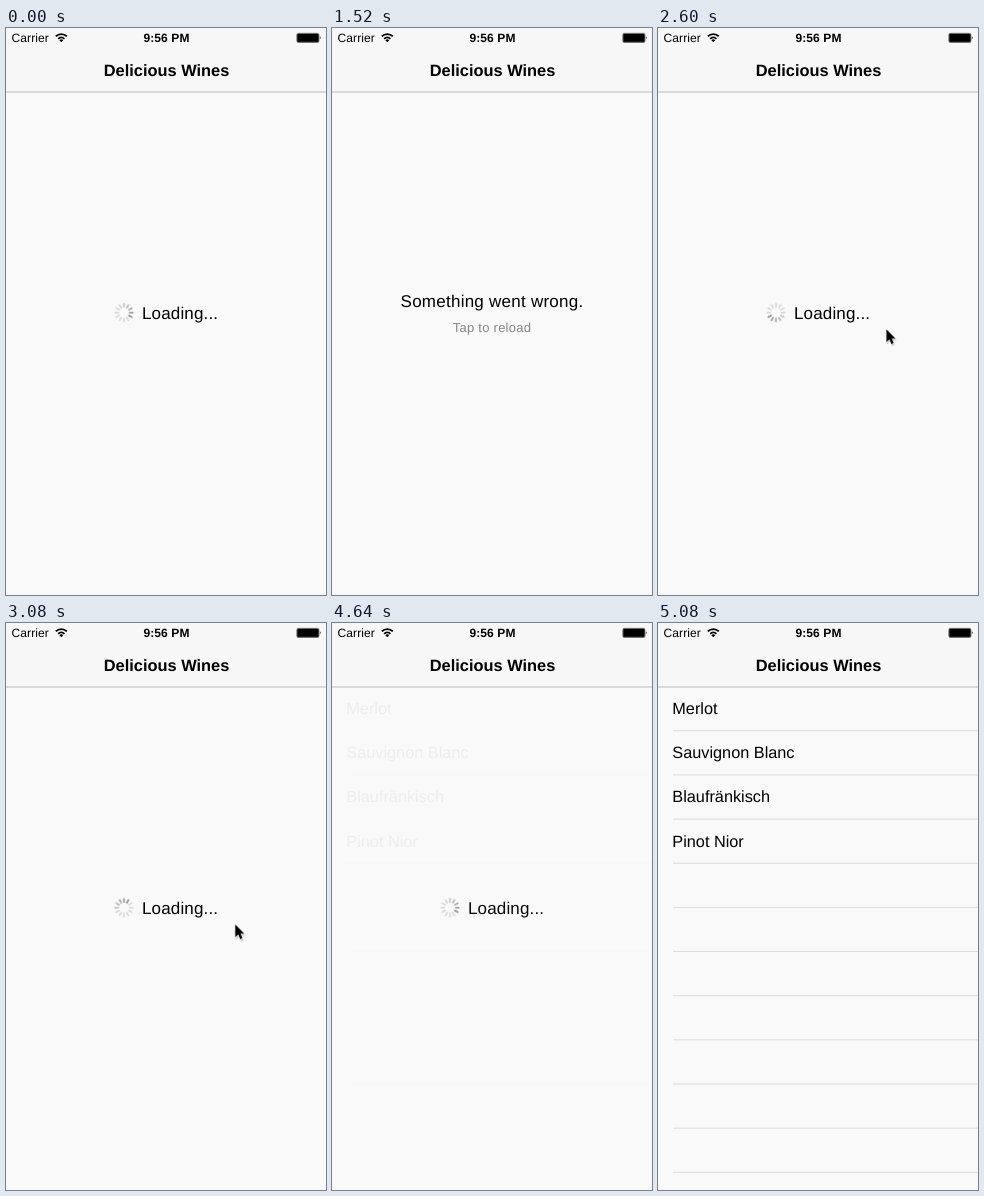
An HTML page that plays this animation: 320x567 px, repeating every 6.28 s.

```html
<!DOCTYPE html>
<html lang="en">
<head>
<meta charset="utf-8">
<title>Loading list</title>
<style>
  html, body { margin: 0; width: 100%; height: 100%; overflow: hidden; background: #f9f9f9; }
  svg { display: block; width: 100vw; height: 100vh; }
  text {
    font-family: "Liberation Sans", Arial, Helvetica, sans-serif;
    font-size: 17px;
    text-rendering: geometricPrecision;
  }
  .bar text { font-size: 12px; letter-spacing: .1px; }
  .bar .time { font-weight: bold; }
  .bar .title { font-size: 16.4px; font-weight: bold; letter-spacing: 0; }
  .mid { text-anchor: middle; }
  .error text { letter-spacing: .25px; }
  .error .hint { font-size: 13px; fill: #858585; }
  .list text { font-size: 16.3px; }

  .loading, .error, .list, .cursor { animation: 6280ms linear infinite; }
  .loading { animation-name: loading; }
  .error { animation-name: error; }
  .list { animation-name: list; }
  .cursor { animation-name: cursor; }
  .spin { animation: spin 6280ms -20ms infinite; }

  @keyframes loading {
    0% { opacity: 1; }
    20.38% { opacity: 1; animation-timing-function: ease-in-out; }
    24.2%, 41.39% { opacity: 0; }
    41.4% { opacity: 1; }
    73.2% { opacity: 1; animation-timing-function: ease-in-out; }
    78.34%, 100% { opacity: 0; }
  }
  @keyframes error {
    0% { opacity: 0; }
    20.38% { opacity: 0; animation-timing-function: ease-in-out; }
    24.2%, 41.39% { opacity: 1; }
    41.4%, 100% { opacity: 0; }
  }
  @keyframes list {
    0% { opacity: 0; }
    73.1% { opacity: 0; animation-timing-function: ease-in-out; }
    78.34%, 100% { opacity: 1; }
  }
  /* One spoke every 100 ms; the second run starts afresh with the reload. */
  @keyframes spin {
    0% { transform: rotate(120deg); animation-timing-function: steps(26); }
    41.39% { transform: rotate(900deg); animation-timing-function: step-end; }
    41.4% { transform: rotate(240deg); animation-timing-function: steps(36); }
    98.73%, 100% { transform: rotate(1320deg); }
  }
  @keyframes cursor {
    0%, 31.2% { transform: translate(330px, 335px); }
    31.85% { transform: translate(311px, 331px); animation-timing-function: ease-out; }
    38.22%, 49.04% { transform: translate(228px, 301px); }
    49.68% { transform: translate(250px, 303px); }
    50.32% { transform: translate(295px, 306px); }
    50.96%, 100% { transform: translate(340px, 308px); }
  }
</style>
</head>
<body>
<svg viewBox="0 0 320 567" preserveAspectRatio="none">
  <rect width="320" height="567" fill="#f9f9f9"/>

  <g class="list" id="list"></g>

  <g class="error">
    <text class="mid" x="160" y="279">Something went wrong.</text>
    <text class="mid hint" x="160" y="304">Tap to reload</text>
  </g>

  <g class="loading">
    <g transform="translate(118 284.7)"><g class="spin" id="spin"></g></g>
    <text x="136" y="290.800" letter-spacing=".15">Loading...</text>
  </g>

  <g class="bar">
    <rect width="320" height="64" fill="#f7f7f7"/>
    <rect y="63.5" width="320" height="1" fill="#bcbcbc"/>
    <text x="5.5" y="14.3">Carrier</text>
    <g fill="none" stroke="#000" stroke-width="1.8">
      <path d="M49.8 8.4a7.8 7.8 0 0 1 11 0M52.2 10.8a4.4 4.4 0 0 1 6.2 0"/>
      <path d="M55.3 14.2l-1.9-1.9a2.7 2.7 0 0 1 3.8 0z" fill="#000" stroke="none"/>
    </g>
    <text class="mid time" x="160.5" y="14.3">9:56 PM</text>
    <rect x="290.8" y="5.3" width="22.200" height="9.200" rx="1.600" fill="#666" stroke="#333" stroke-width=".5"/>
    <rect x="291.5" y="6" width="20.800" height="7.800" rx=".9"/>
    <path d="M313.9 8.3q1.600 1.600 0 3.200z"/>
    <text class="mid title" x="160.5" y="48">Delicious Wines</text>
  </g>

  <g class="cursor">
    <g transform="scale(.94)">
      <path d="M1 2v14.500l3.400-3 2.300 5 2.700-1.200-2.200-4.800h4.300z" opacity=".15"/>
      <path d="M.5 .5v13.500l3.200-2.900 2.100 4.900 2.400-1-2.100-4.800h4.100z" stroke="#fff" paint-order="stroke"/>
    </g>
  </g>
</svg>
<script>
  const add = (parent, tag, attrs, text = "") => {
    const el = document.createElementNS("http://www.w3.org/2000/svg", tag);
    for (const key in attrs) el.setAttribute(key, attrs[key]);
    el.textContent = text;
    parent.append(el);
  };

  const list = document.getElementById("list");
  const wines = ["Merlot", "Sauvignon Blanc", "Blaufränkisch", "Pinot Nior"];
  wines.forEach((name, i) => add(list, "text", { x: 14.3, y: 91.2 + 44.1 * i }, name));
  for (let y = 107.3; y < 567; y += 44.15) {
    add(list, "rect", { x: 15, y, width: 305, height: 1, fill: "#dcdcdc" });
  }

  // The leading spoke is darkest; the others fade out behind it.
  const spin = document.getElementById("spin");
  for (let i = 0; i < 12; i++) {
    add(spin, "line", {
      y1: -5.6, y2: -9, stroke: "#808080", "stroke-width": 1.5, "stroke-linecap": "round",
      opacity: Math.max(0.3, 1 - 0.13 * i), transform: `rotate(${-30 * i})`
    });
  }
</script>
</body>
</html>
```
